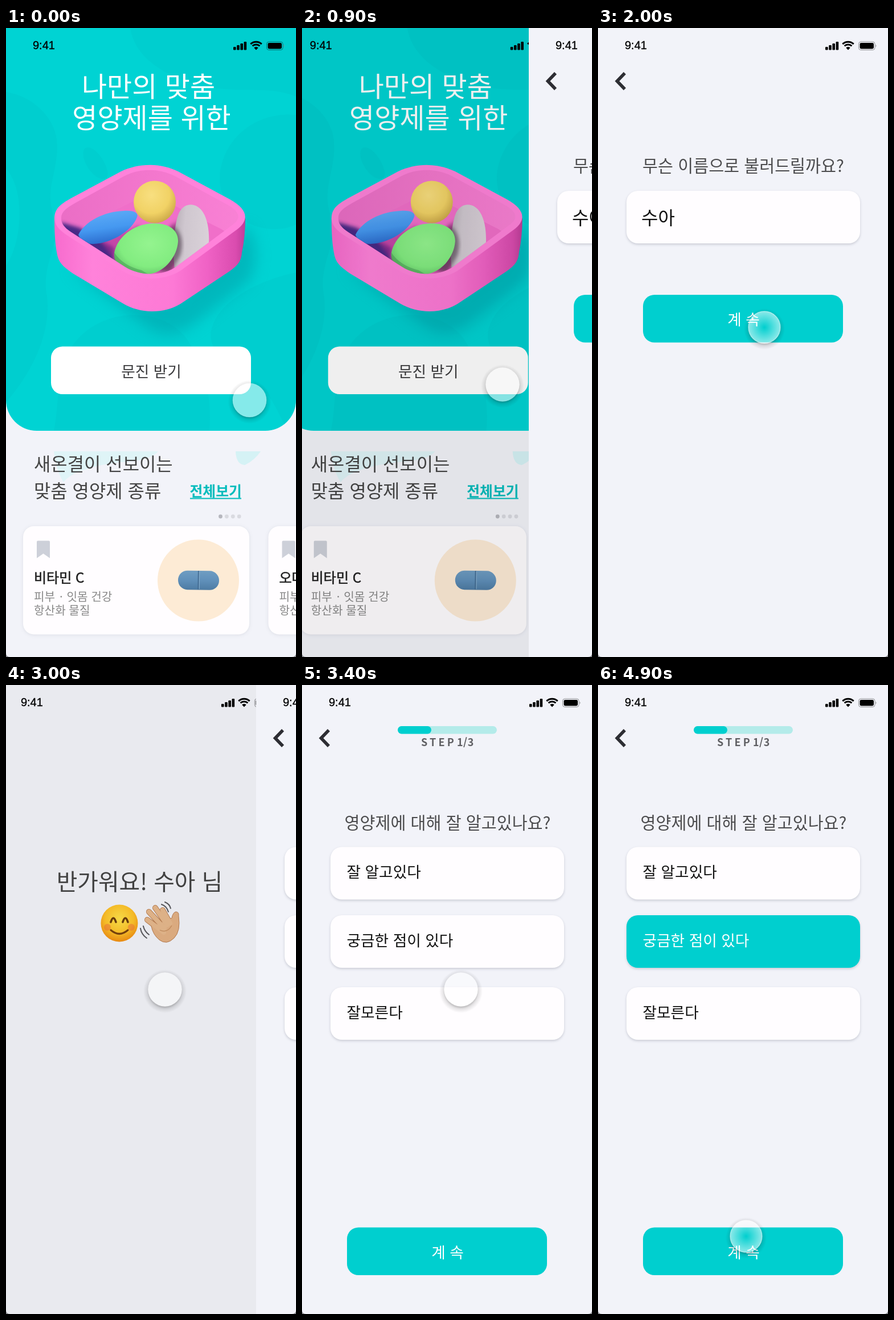
An HTML page that plays this animation: 509 by 1101 pixels, repeating every 5 s.

```html
<!DOCTYPE html>
<html lang="ko">
<head>
<meta charset="utf-8">
<style>
html, body { margin: 0; width: 100%; height: 100%; overflow: hidden; background: #f2f3f9; }
svg { display: block; width: 509px; height: 1101px; }
text { font-family: "Noto Sans CJK KR", "Noto Sans KR", "Noto Sans CJK", "Noto Sans CJK JP", sans-serif; white-space: pre; }
.clock { font: 20px "Liberation Sans", Arial, sans-serif; }
.card { fill: #fffdff; filter: drop-shadow(0 2px 2px rgba(40, 45, 70, .2)); }
.soft { filter: drop-shadow(0 1px 3px rgba(40, 45, 70, .1)); }
</style>
</head>
<body>
<svg id="stage" viewBox="0 0 509 1101"></svg>
<script>
const stage = document.getElementById('stage');

// Markup helpers
const text = (x, y, size, fill, s, more = '') =>
  `<text x="${x}" y="${y}" font-size="${size}" fill="${fill}" ${more}>${s}</text>`;
const mid = (x, y, size, fill, s, more = '') => text(x, y, size, fill, s, `text-anchor="middle" ${more}`);
const box = (x, y, w, h, r, more) => `<rect x="${x}" y="${y}" width="${w}" height="${h}" rx="${r}" ${more}/>`;
const path = (d, fill, more = '') => `<path d="${d}" fill="${fill}" ${more}/>`;
const line = (d, color, width, more = '') => path(d, 'none', `stroke="${color}" stroke-width="${width}" ${more}`);
const radial = (id, stops, more = '') => `<radialGradient id="${id}" ${more}>${stops.map(([o, c, a = 1]) =>
  `<stop offset="${o}" stop-color="${c}" stop-opacity="${a}"/>`).join('')}</radialGradient>`;
const linear = (id, stops, more = '') =>
  radial(id, stops, more).replaceAll('radialGradient', 'linearGradient');

const status = text(47, 37, 20, '#000', '9:41', 'class="clock" stroke="#000" stroke-width=".3"') +
  [0, 1, 2, 3].map(i => box(399 + i * 6.2, 33 - i * 3, 4.6, 5.5 + i * 3, 1.3, '')).join('') +
  line('M429.3 28.1A14 14 0 0 1 448.7 28.1M432.6 31.5A9.2 9.2 0 0 1 445.4 31.5', '#000', 3) +
  path('M439 38.5L435.2 34.6A5.3 5.3 0 0 1 442.8 34.6Z', '#000') +
  box(457.5, 24, 28.5, 14.5, 4, 'fill="none" stroke="#000" stroke-opacity=".4"') +
  box(459.5, 26, 24.5, 10.5, 2.4, '') + path('M487.5 29q2 2.2 0 4.5Z', '#888');

const back = line('M47 79L33.5 93L47 107', '#2d2d33', 5.6);
const button = y => box(79, y, 351, 83.5, 20, 'fill="#00cfcf"') + mid(255.5, y + 53, 26.7, '#fff', '계 속');
const field = (y, id = '') => box(50, y, 410, 92, 20, `class="card" ${id}`);
const screen = (id, body, shade) => `<g id="${id}"><rect width="509" height="1101" fill="#f2f3f9"/>${body}${status}` +
  (shade ? `<rect id="${shade}" width="509" height="1101" opacity="0"/>` : '') + '</g>';

const defs = '<defs>' +
  radial('yellow', [[0, '#f8df80'], [.6, '#f1d265'], [1, '#c6a244']], 'cx=".42" cy=".34" r=".72"') +
  radial('green', [[0, '#94f48f'], [.65, '#82ec80'], [1, '#5dbd63']], 'cx=".55" cy=".4" r=".7"') +
  linear('blue', [[0, '#62aff8'], [.6, '#4598f0'], [1, '#2d6fd0']], 'x2=".25" y2="1"') +
  linear('grey', [[0, '#b4abb4'], [.35, '#cfc7cf'], [1, '#d9d1d8']], 'y2=".2"') +
  linear('side', [[0, '#f76bcd'], [.2, '#ff82da'], [.62, '#fd79d5'], [.8, '#f062c5'], [.95, '#da4caf'], [1, '#bf3d99']]) +
  linear('wall', [[0, '#ea6dc5'], [.5, '#f377cd'], [1, '#f982d5']]) +
  linear('capsule', [[0, '#6f9dc2'], [.5, '#6090ba'], [1, '#4d7ba3']], 'x2="0" y2="1"') +
  radial('face', [[0, '#ffe24a'], [.6, '#fec32a'], [1, '#f08a10']], 'cy=".38" r=".64"') +
  radial('press', [[0, '#fff', 0], [1, '#fff', .55]]) +
  radial('shadow', [[.68, '#000', .3], [.82, '#000', .1], [1, '#000', 0]],
    'gradientUnits="userSpaceOnUse" cx="0" cy="3" r="38"') +
  '<filter id="blur" x="-30%" y="-30%" width="160%" height="160%"><feGaussianBlur stdDeviation="13"/></filter>' +
  '<filter id="blur2"><feGaussianBlur stdDeviation="3"/></filter>' +
  '<clipPath id="panel"><rect y="-80" width="509" height="785" rx="54"/></clipPath>' +
  '<clipPath id="inside"><path d="M97 334C96 322 106 315 122 306L206 260C234 245 270 245 298 260L388 309C412 322 413 334 397 345L301 416C276 435 236 435 209 418L114 357C102 349 97 342 97 334Z"/></clipPath></defs>';

const blobs = [
  'M218 0C226 50 275 82 330 98C405 118 455 98 509 120V0Z',
  'M0 112C42 118 84 152 89 196C94 250 66 280 84 330C100 376 60 412 72 470C80 540 40 610 0 655Z',
  'M509 152C440 146 386 190 376 250C368 312 420 352 470 352C490 352 500 348 509 344Z',
  'M138 211C150 202 172 226 178 250C182 272 160 266 148 250C138 238 132 220 138 211Z',
  'M84 705C96 650 84 585 130 540C185 486 280 492 318 545C346 590 362 635 357 705Z',
  'M509 428C440 442 370 480 360 530C352 580 420 600 458 640C478 668 486 690 494 705H509Z'
].map(d => path(d, '#00b9be', 'opacity=".2"')).join('') +
  path('M0 246C18 266 26 300 23 342C20 380 8 404 0 416Z', '#00dedb', 'opacity=".3"');

const tray =
  path('M110 420L250 525Q285 548 325 522L425 445Q452 400 424 345L300 470Z', '#009ba6', 'opacity=".5" filter="url(#blur)"') +
  path('M85 333C85 365 87 385 91 401C94 413 105 421 118 430L205 482C235 500 276 501 306 483L392 426C408 415 413 407 414 393Q420 365 420 333Z', 'url(#side)') +
  path('M85 333C85 315 98 307 116 297L202 251C234 236 270 236 302 251L393 300C424 317 428 336 405 353L306 425C276 443 234 443 204 425L106 362C92 353 85 343 85 333Z', '#ff82da') +
  '<g clip-path="url(#inside)"><rect x="85" y="235" width="340" height="210" fill="url(#wall)"/>' +
  path('M85 380L125 352L222 304Q250 290 282 304L378 352L420 380V450H85Z', '#f06fc9') +
  path('M96 340L130 350L190 385V425L100 365Z', '#35237f', 'opacity=".9" filter="url(#blur2)"') +
  path('M165 372L235 345L230 400L200 420Z', '#a92f91', 'opacity=".6" filter="url(#blur2)"') +
  path('M285 350Q322 315 318 385L290 425L260 430Z', '#96327f', 'opacity=".6" filter="url(#blur2)"') +
  path('M297 430C292 400 294 340 305 321C316 303 337 307 346 323C360 345 358 390 350 410L322 440Z', 'url(#grey)') +
  path('M292 345Q316 362 306 398L288 428L270 425Z', '#4a3b4a', 'opacity=".6" filter="url(#blur2)"') +
  '<circle cx="261" cy="304.5" r="37" fill="url(#yellow)"/>' +
  path('M127 362C138 339 172 321 207 320C225 319 233 324 230 331C222 354 186 377 153 378C139 378 131 372 127 362Z', 'url(#blue)') +
  path('M190 394C195 366 224 343 258 342C286 341 303 354 302 374C300 402 276 430 248 431C218 432 187 415 190 394Z', 'url(#green)') +
  path('M190 393Q205 416 238 424L253 433Q205 430 190 406Z', '#3f8f4e', 'opacity=".45"') + '</g>';

const product = (dx, name) => `<g transform="translate(${dx} 0)">` +
  box(30, 872, 397, 189.5, 19, 'class="card soft"') +
  path('M54 899.5q0-2 2-2H75q2 0 2 2V928L65.5 920L54 928Z', '#cdd0d9') +
  text(49, 971, 24, '#222', name, 'stroke="#222" stroke-width=".6"') +
  text(49, 1003, 20.2, '#888', '피부<tspan x="94">·</tspan><tspan x="106.5">잇몸 건강</tspan>') +
  text(49, 1027, 20.2, '#888', '항산화 물질') +
  '<circle cx="337.5" cy="967" r="71.5" fill="#fdebd5"/>' +
  '<g transform="rotate(1 338 967)">' + box(302, 950, 72, 33.5, 16.5, 'fill="url(#capsule)"') +
  line('M337.5 950V983', '#426a90', 1.6) + line('M339.5 951V982', '#86acca', 1) + '</g></g>';

const home = '<g clip-path="url(#panel)"><rect width="509" height="705" fill="#00d3d3"/>' + blobs + '</g>' +
  mid(250, 119.5, 48, '#fff', '나만의 맞춤', 'font-weight="300"') +
  mid(255.5, 175, 48, '#fff', '영양제를 위한', 'font-weight="300"') + tray +
  box(79, 557.5, 351, 83.5, 20, 'fill="#fff"') + mid(255, 611, 26.7, '#3b3b3d', '문진 받기') +
  path('M84 741H267Q255 757 200 760Q120 770 101 795Q88 775 84 741Z', '#dff4f7') +
  path('M403 741H447Q436 757 419 765Q404 764 403 741Z', '#d5f2f5') +
  text(49, 775, 31.9, '#444', '새온결이 선보이는', 'font-weight="300"') +
  text(49, 822, 31.9, '#444', '맞춤 영양제 종류', 'font-weight="300"') +
  text(322.5, 820, 24.8, '#00bcbc', '전체보기', 'font-weight="700"') + box(323, 822.5, 90, 2, 0, 'fill="#00bcbc"') +
  [0, 1, 2, 3].map(i => `<circle cx="${376.5 + i * 10.9}" cy="855" r="3.4" fill="${i ? '#d9dae0' : '#b6b7be'}"/>`).join('') +
  product(0, '비타민 C') + product(430.5, '오메가 3');

const ask = back + mid(255, 252, 29.3, '#4c4c4e', '무슨 이름으로 불러드릴까요?') +
  field(285) + text(76, 344, 32, '#111', '수아') + button(467);

const round = 'stroke-linecap="round" stroke-linejoin="round"';
const fingers = 'M298 433L269 411M299 426L272 397M304 420L283 390M309 417L296 394';
const hand = line(fingers, '#b97d50', 10, round) +
  path('M285 419L312 408Q314 398 319 397Q325 397 324 404Q328 431 316 443Q303 456 290 446Q279 437 276 422Z', '#e3b184', 'stroke="#b97d50"') +
  line(fingers, '#e6b88c', 8.2, round) + line('M291 429Q304 435 312 421', '#c68f60', 1.3) +
  line('M257 426Q259 437 268 443M262 422Q264 431 272 437M294 384Q303 387 306 397M300 380Q308 383 310 391', '#59595d', 2, round);
const greet = mid(255.5, 359, 39.8, '#444', '반가워요! 수아 님') +
  '<circle cx="220" cy="417" r="32.5" fill="url(#face)"/>' +
  '<g fill="#f2703c" opacity=".5"><circle cx="199" cy="424" r="6"/><circle cx="241" cy="424" r="6"/></g>' +
  line('M205 415Q209.5 401 214 415M226 415Q230.5 401 235 415', '#6b3d0c', 3.6, round) +
  line('M205 429Q220 442 235 429', '#7a430c', 3.2, round) + hand;

const step = back + box(168, 72, 174, 13.5, 6.7, 'fill="#b4ebea"') + box(168, 72, 59, 13.5, 6.7, 'fill="#00cfcf"') +
  text(209, 107, 18, '#5f5f63', '<tspan letter-spacing="4.2">STEP</tspan><tspan x="272" letter-spacing=".5">1/3</tspan>', 'font-weight="600"') +
  mid(255.5, 252, 29.3, '#4c4c4e', '영양제에 대해 잘 알고있나요?') +
  field(283.5) + text(78.5, 337, 26.7, '#111', '잘 알고있다') +
  field(403, 'id="choice"') + text(78.5, 457, 26.7, '#111', '궁금한 점이 있다', 'id="label"') +
  field(529) + text(78.5, 583, 26.7, '#111', '잘모른다') + button(949.5);

// The shadow is a ring, so it never shows through the translucent cursor
const ring = 'M-42 3A42 42 0 0 1 42 3A42 42 0 0 1 -42 3ZM-29.5 0A29.5 29.5 0 0 1 29.5 0A29.5 29.5 0 0 1 -29.5 0Z';
const cursor = '<g id="cursor">' + path(ring, 'url(#shadow)', 'fill-rule="evenodd"') +
  '<circle id="flat" r="29.5" fill="#fff" fill-opacity=".52" stroke="#fff" stroke-opacity=".3"/>' +
  '<circle id="held" r="29.5" fill="url(#press)" stroke="#fff" stroke-opacity=".45" stroke-width="1.5"/></g>';

stage.innerHTML = defs + screen('home', home, 'homeShade') + screen('ask', ask) +
  screen('greet', greet, 'greetShade') + screen('step', step) +
  path('M0 1094Q0 1101 7 1101H0ZM509 1094Q509 1101 502 1101H509Z', '#85868b') + cursor;

const el = id => document.getElementById(id);
const set = (id, name, value) => el(id).setAttribute(name, value);
const span = (t, start, length) => Math.min(1, Math.max(0, (t - start) / length));
const ease = p => p * p * (3 - 2 * p);
const mix = (a, b, p) => a + (b - a) * p;

// Cursor moves: start, end, then the point reached
const moves = [[50, 550, 352, 624], [1300, 1800, 292, 524], [2100, 2300, 279, 533],
  [3500, 3900, 262, 462], [4300, 4800, 260, 965]];
const presses = [[550, 750], [1850, 2150], [3850, 4200], [4800, 5200]];

function push(under, over, p) {
  set(over, 'transform', `translate(${Math.round(509 * (1 - p))} 0)`);
  set(under, 'transform', `translate(${-152.7 * p} 0)`);
  set(under + 'Shade', 'opacity', .28 * p);
}

function draw(t) {
  push('home', 'ask', ease(span(t, 728, 571)));
  set('greet', 'opacity', span(t, 2080, 340));
  push('greet', 'step', ease(span(t, 2881, 510)));

  const picked = span(t, 3950, 200);
  el('choice').style.fill = `rgb(${mix(255, 0, picked)},${mix(253, 207, picked)},${mix(255, 207, picked)})`;
  const ink = mix(17, 255, picked);
  set('label', 'fill', `rgb(${ink},${ink},${ink})`);

  let x = 427.5, y = 651.5;
  for (const [start, end, toX, toY] of moves) {
    const p = ease(span(t, start, end - start));
    x = mix(x, toX, p);
    y = mix(y, toY, p);
  }
  const held = Math.max(...presses.map(([a, b]) => span(t, a, 100) - span(t, b - 100, 100)));
  set('cursor', 'transform', `translate(${x} ${y}) scale(${1 - .05 * held})`);
  set('flat', 'opacity', 1 - held);
  set('held', 'opacity', held);
}

// The picture advances ten times a second
const begin = performance.now();
function tick() {
  draw(Math.floor((performance.now() - begin) % 5000 / 100) * 100);
  requestAnimationFrame(tick);
}
tick();
</script>
</body>
</html>
```
